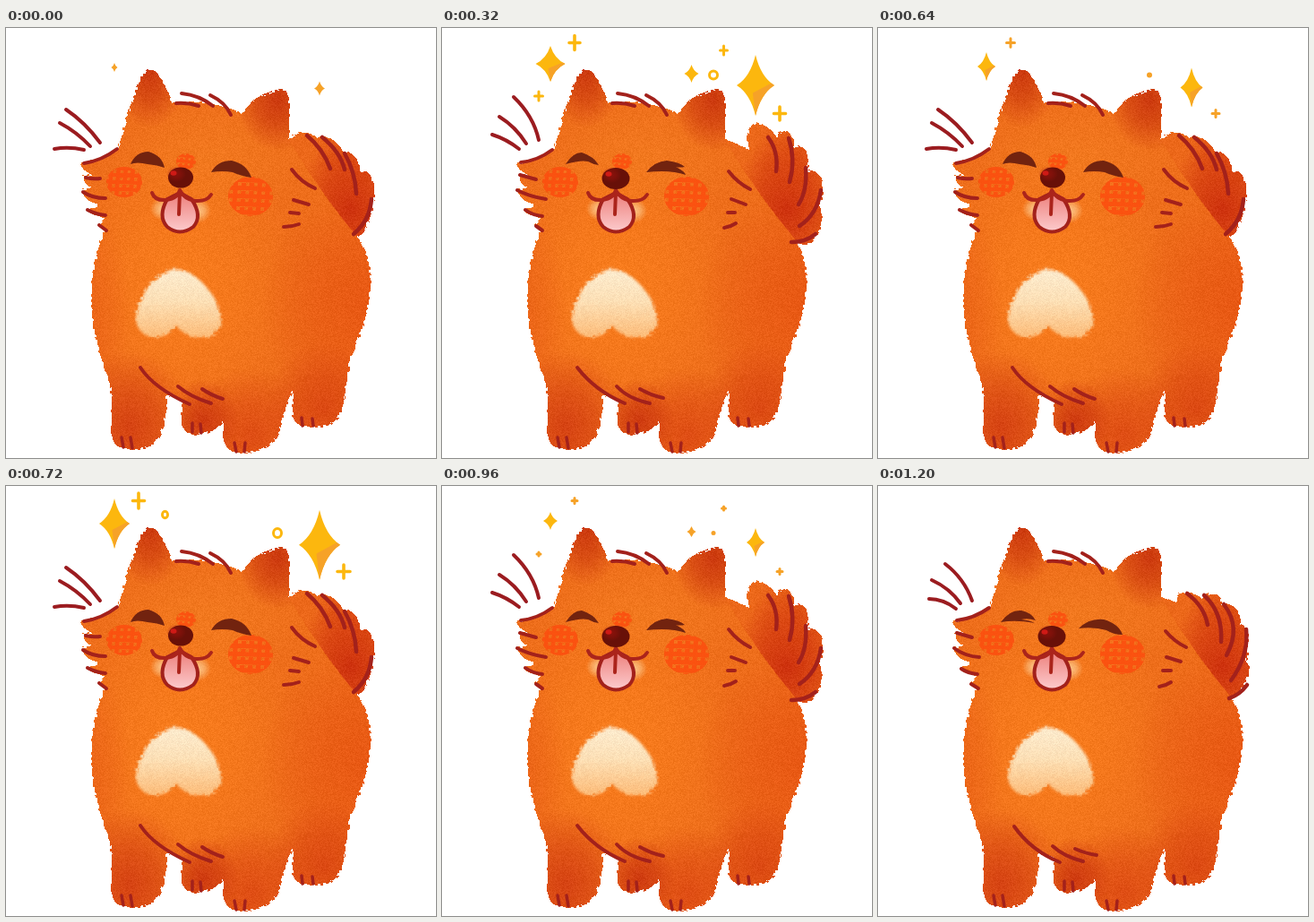
An HTML page with a canvas for the animation above (1280 ms loop, 480 by 480 pixels).

```html
<!DOCTYPE html>
<html lang="en">
<head>
<meta charset="utf-8">
<title>Happy dog</title>
<style>
html, body { margin: 0; width: 100%; height: 100%; overflow: hidden; background: #fff; }
canvas { display: block; width: 100vw; height: 100vh; }
</style>
</head>
<body>
<canvas id="stage" width="480" height="480"></canvas>
<script>
const SIZE = 480, STEP = 80, LOOP = 1280;
const ctx = document.getElementById('stage').getContext('2d');
const LINE = '#a3211b';

const BODY = new Path2D(
  'M125 135C131 113 140 80 150 57Q160 39 170 52Q180 66 185 84Q225 78 262 95Q284 72 308 69Q316 69 316 82' +
  'L316 124C330 150 362 198 393 234Q408 256 407 290Q405 325 385 365L377 418Q373 445 345 446' +
  'Q319 446 320 430L321 405Q314 412 311 430Q304 460 292 468Q270 478 250 472Q241 464 242 450L243 415' +
  'Q210 422 196 414L179 410Q181 445 165 465Q145 475 124 467Q116 460 118 448Q120 400 112 385' +
  'Q95 340 95 300Q96 265 108 230');
const CHEEK = new Path2D(
  'M108 230L114 226Q104 224 103 219L110 212Q96 210 91 203L104 197Q88 194 84 181L96 178' +
  'Q86 174 86 165L98 164Q85 160 83 152Q105 147 125 135L250 150L250 300Z');
const BACK_LEG = new Path2D('M196 405L196 440Q198 454 212 454Q236 452 242 438L243 405Z');
const HEART = new Path2D('M190 269C212 270 239 300 240 326C239 350 205 353 190 332C176 353 146 348 145 324C146 300 169 270 190 269Z');
const TONGUE = new Path2D('M180 191Q169 210 180 222Q194 233 209 222Q220 210 207 191L194 184Z');
const MOUTH = new Path2D('M163 184Q166 193 179 192Q192 190 194 181Q199 191 211 193Q224 194 229 186M194 183L193 208');
const FOREHEAD = new Path2D('M196 73Q216 75 231 87M228 75Q245 83 251 97M190 84Q203 83 215 87');
const TOES = new Path2D('M129 457L131 468M139 457L141 469M208 441L208 451M217 442L218 452M255 463L257 473M267 463L266 473M330 435L331 444M342 436L343 444');

const poses = [
  {
    tail: 'M314 128Q322 115 336 117Q346 119 348 125Q354 117 365 125Q374 131 377 139Q386 136 393 149Q396 155 395 160Q404 157 409 169Q413 185 409 200Q408 216 393 234L330 190Z',
    tailLines: 'M336 120Q354 135 362 157M353 122Q373 138 378 158M378 140Q390 161 391 185M408 191Q406 215 388 230',
    whiskers: 'M67 91Q88 105 105 128M60 106Q79 116 94 132M54 135Q70 132 87 136',
    cheek: 'M87 151Q107 148 124 135M89 167Q97 169 105 168M86 183Q96 190 111 190M91 203Q100 208 111 209M104 220L112 226',
    side: 'M319 158Q329 172 345 179M321 192L338 197M317 206L327 207M310 222Q319 222 327 219',
    belly: 'M150 379Q165 402 205 420M192 400Q206 412 229 419M219 403Q229 410 242 414',
    eyes: 'M139 152Q145 138 159 138Q174 142 177 156Q169 153 158 152Q146 149 139 152ZM229 161Q236 148 252 148Q269 152 274 167Q262 165 253 161Q241 159 229 161Z',
    nose: [195, 167, 14, 11.5]
  },
  {
    tail: 'M316 124L333 130Q330 119 344 119Q356 120 362 126Q366 118 378 121Q385 126 383 133Q397 129 403 142Q406 150 404 155Q414 155 413 175Q414 186 411 195Q418 204 409 222Q404 233 393 237L330 190Z',
    tailLines: 'M345 120Q364 134 368 155M364 122Q385 141 383 174M386 132Q406 158 389 189M411 160Q414 190 394 217M412 222Q404 233 392 237',
    whiskers: 'M75 87Q96 103 105 128M60 105Q80 114 92 131M57 126Q73 126 87 137',
    cheek: 'M88 150Q107 148 124 136M88 164L105 169M85 181Q97 190 113 191M93 204Q100 209 111 210M104 221L112 226',
    side: 'M321 162Q331 174 344 180M322 191L338 196M318 206L327 206M314 224Q321 223 327 219',
    belly: 'M152 380Q171 407 203 420M195 402Q208 414 229 419M220 405Q231 410 244 412',
    eyes: 'M137 152Q147 138 160 139Q171 141 176 150Q167 147 160 149Q170 150 175 153Q154 149 137 152ZM224 159Q236 147 252 149Q269 154 273 166Q263 166 255 161Q241 157 224 159Z',
    nose: [194, 168, 15.5, 12]
  },
  {
    tail: 'M316 124L343 136Q337 110 350 106Q366 108 373 122Q378 112 388 117Q394 124 393 134Q404 128 408 142Q410 152 407 160Q420 156 425 172Q427 185 421 198Q426 205 424 216Q417 241 405 241L390 240L330 190Z',
    tailLines: 'M364 122Q376 138 373 160M387 123Q395 147 388 172M406 156Q408 181 398 197M423 181Q419 208 399 221M417 230Q406 239 390 239',
    whiskers: 'M80 77Q102 98 108 125M64 99Q82 110 94 129M56 119Q72 124 86 135',
    cheek: 'M88 150Q107 148 123 136M87 164L105 169M84 181Q97 188 116 191M93 203Q101 209 112 210M105 221L112 226',
    side: 'M320 160Q330 173 344 180M323 191L339 197M319 206L327 206M315 223Q322 222 328 218',
    belly: 'M151 379Q171 405 204 419M195 400Q208 414 232 419M221 403Q233 410 247 413',
    eyes: 'M138 152Q146 139 156 139Q169 143 175 153Q168 152 163 149Q155 147 138 152ZM228 161Q237 149 251 148Q266 150 271 155Q265 156 261 155Q271 160 272 164Q255 158 228 161Z',
    nose: [194, 168, 15.5, 12]
  }
];
const ORDER = [0, 0, 1, 1, 2, 2, 1, 1];

function makeRandom(seed) {
  return () => (seed = (seed * 16807) % 2147483647) / 2147483647;
}

function layer() {
  const c = document.createElement('canvas');
  c.width = c.height = SIZE;
  return c.getContext('2d');
}

// Soft elliptical spot that fades out at its rim
function glow(g, x, y, rx, ry, rgb, alpha) {
  g.save();
  g.translate(x, y);
  g.scale(rx, ry);
  const fade = g.createRadialGradient(0, 0, 0, 0, 0, 1);
  fade.addColorStop(0, `rgba(${rgb},${alpha})`);
  fade.addColorStop(0.5, `rgba(${rgb},${alpha * 0.6})`);
  fade.addColorStop(1, `rgba(${rgb},0)`);
  g.fillStyle = fade;
  g.fillRect(-1, -1, 2, 2);
  g.restore();
}

function stroke(g, path, color = LINE, width = 4) {
  g.strokeStyle = color;
  g.lineWidth = width;
  g.stroke(typeof path === 'string' ? new Path2D(path) : path);
}

function ellipse(g, x, y, rx, ry, color) {
  g.beginPath();
  g.ellipse(x, y, rx, ry, 0, 0, Math.PI * 2);
  if (color) {
    g.fillStyle = color;
    g.fill();
  }
}

// Roughens the outline in small blocks and adds a fine grain
function grain(g) {
  const rnd = makeRandom(77), cell = 3, cols = SIZE / cell;
  const shift = Array.from({ length: cols * cols }, () => Math.round((rnd() - 0.5) * 2.2));
  const src = g.getImageData(0, 0, SIZE, SIZE);
  const out = g.createImageData(SIZE, SIZE);
  for (let y = 2; y < SIZE - 2; y++) {
    for (let x = 2; x < SIZE - 2; x++) {
      const d = shift[Math.floor(y / cell) * cols + Math.floor(x / cell)];
      const from = ((y + d) * SIZE + x + d) * 4;
      const to = (y * SIZE + x) * 4;
      const n = (rnd() - 0.5) * 16;
      for (let k = 0; k < 3; k++) out.data[to + k] = src.data[from + k] + n;
      out.data[to + 3] = src.data[from + 3] > 127 ? 255 : 0;
    }
  }
  g.putImageData(out, 0, 0);
}

function blush(g, x, y, rx, ry, gap) {
  g.save();
  ellipse(g, x, y, rx, ry, 'rgba(252,78,16,.12)');
  g.clip();
  g.strokeStyle = 'rgba(253,76,14,.82)';
  g.lineWidth = gap * 0.56;
  g.beginPath();
  for (let d = -3 * gap; d <= 3 * gap; d += gap) {
    g.moveTo(x + d + 2, y - ry);
    g.lineTo(x + d - 1, y + ry);
    g.moveTo(x - rx, y + d - 1);
    g.lineTo(x + rx, y + d + 1);
  }
  g.stroke();
  g.restore();
}

function paintTail(g, tail) {
  g.fillStyle = '#ec681a';
  g.fill(tail);
  g.globalCompositeOperation = 'source-atop';
  glow(g, 385, 200, 62, 80, '205,48,14', 1);
  glow(g, 388, 150, 45, 55, '216,66,16', 0.6);
  g.globalCompositeOperation = 'source-over';
}

function paintCoat(g) {
  const coat = layer();
  coat.fillStyle = '#ee6e1b';
  for (const p of [BACK_LEG, BODY, CHEEK]) coat.fill(p);
  coat.globalCompositeOperation = 'source-atop';
  glow(coat, 195, 285, 130, 170, '249,126,29', 0.95);
  glow(coat, 225, 145, 110, 70, '243,124,32', 0.7);
  glow(coat, 405, 310, 120, 140, '230,80,17', 0.75);
  glow(coat, 95, 320, 45, 120, '229,83,19', 0.4);
  glow(coat, 160, 48, 42, 64, '203,56,14', 1);
  glow(coat, 303, 80, 46, 58, '203,56,14', 1);
  glow(coat, 138, 445, 70, 85, '212,64,18', 0.95);
  glow(coat, 275, 455, 75, 75, '218,68,18', 0.8);
  glow(coat, 355, 425, 65, 75, '216,66,17', 0.85);
  glow(coat, 220, 438, 40, 46, '206,58,16', 1);
  g.drawImage(coat.canvas, 0, 0);
}

function paintChest(g) {
  const fill = g.createLinearGradient(0, 270, 0, 348);
  fill.addColorStop(0, '#fdebce');
  fill.addColorStop(0.45, '#fddfb5');
  fill.addColorStop(1, '#fdb974');
  g.save();
  g.filter = 'blur(1.5px)';
  g.fillStyle = fill;
  g.fill(HEART);
  g.restore();
}

function paintFace(g, pose) {
  blush(g, 132, 172, 20, 17, 8);
  blush(g, 273, 188, 25, 22, 9);
  blush(g, 201, 149, 11, 9, 6);
  glow(g, 175, 202, 14, 13, '255,224,174', 0.75);
  glow(g, 214, 204, 15, 14, '255,224,174', 0.75);

  const pink = g.createLinearGradient(0, 188, 0, 226);
  pink.addColorStop(0, '#ee8682');
  pink.addColorStop(1, '#fcc9cb');
  g.fillStyle = pink;
  g.fill(TONGUE);
  stroke(g, TONGUE, LINE, 4);
  stroke(g, MOUTH, '#ab241b', 4);

  const [x, y, rx, ry] = pose.nose;
  ellipse(g, x, y, rx, ry, '#681008');
  glow(g, x - 5, y - 4, 11, 9, '148,18,12', 0.8);
  ellipse(g, x - 8, y - 5, 3.5, 2.8, '#cf1a16');

  g.fillStyle = '#72230f';
  g.fill(new Path2D(pose.eyes));
}

function paintDog(pose) {
  const g = layer();
  paintTail(g, new Path2D(pose.tail));
  paintCoat(g);
  paintChest(g);
  grain(g);
  g.lineCap = g.lineJoin = 'round';
  stroke(g, pose.tailLines, LINE, 4.5);
  stroke(g, pose.whiskers, '#9b1c20', 4);
  for (const p of [pose.cheek, pose.side, pose.belly, FOREHEAD]) stroke(g, p);
  stroke(g, TOES, LINE, 3.5);
  paintFace(g, pose);
  return g.canvas;
}

const GOLD = '#fcb70e', AMBER = '#f6a228';

function star(x, y, w, h) {
  const path = new Path2D();
  const tips = [[0, -h], [w, 0], [0, h], [-w, 0]];
  path.moveTo(x, y - h);
  for (let i = 0; i < 4; i++) {
    const a = tips[i], b = tips[(i + 1) % 4];
    path.quadraticCurveTo(x + (a[0] + b[0]) * 0.28, y + (a[1] + b[1]) * 0.28, x + b[0], y + b[1]);
  }
  ctx.fillStyle = h < 9 ? AMBER : GOLD;
  ctx.fill(path);
  if (h < 12) return;
  ctx.save();
  ctx.clip(path);
  ctx.fillStyle = AMBER;
  ctx.beginPath();
  ctx.moveTo(x + w, y - h * 0.12);
  ctx.lineTo(x - w * 0.15, y + h * 0.25);
  ctx.lineTo(x, y + h);
  ctx.lineTo(x + w, y + h);
  ctx.fill();
  ctx.restore();
}

function plus(x, y, w, h) {
  ctx.strokeStyle = h < 6 ? AMBER : GOLD;
  ctx.lineWidth = h > 6 ? 3.6 : 3;
  ctx.lineCap = 'round';
  ctx.beginPath();
  ctx.moveTo(x, y - h + 1);
  ctx.lineTo(x, y + h - 1);
  ctx.moveTo(x - w + 1, y);
  ctx.lineTo(x + w - 1, y);
  ctx.stroke();
}

function ring(x, y, w, h) {
  ellipse(ctx, x, y, w, h, h < 3.5 ? AMBER : null);
  if (h < 3.5) return;
  ctx.strokeStyle = GOLD;
  ctx.lineWidth = 3;
  ctx.stroke();
}

// Half widths and half heights for each step of a burst
const sparkles = [
  { draw: star, x: 121, y: 44, rise: 1, w: [3.5, 10, 17, 17, 16.5, 8], h: [5, 16, 28, 24, 20, 10] },
  { draw: star, x: 350, y: 67.5, rise: 0.9, w: [6, 12.5, 23, 22, 21, 10], h: [8, 22, 39, 36, 34, 16] },
  { draw: star, x: 278.5, y: 51, rise: 0, w: [0, 0, 0, 5, 8, 5], h: [0, 0, 0, 6, 10, 6] },
  { draw: plus, x: 148, y: 16.5, rise: 0, w: [0, 5.5, 7.5, 7.5, 7, 4], h: [0, 5.8, 9.5, 9.5, 9, 4] },
  { draw: plus, x: 377, y: 95.5, rise: 0, w: [0, 5, 8, 8, 7.5, 4], h: [0, 5, 8.5, 8.5, 8.5, 4] },
  { draw: plus, x: 314.5, y: 25, rise: 0, w: [0, 0, 0, 3, 5, 3], h: [0, 0, 0, 3, 6, 3] },
  { draw: plus, x: 108, y: 76, rise: 0, w: [0, 0, 0, 3, 5.5, 3], h: [0, 0, 0, 3, 6, 3] },
  { draw: ring, x: 303, y: 52.5, rise: 0, w: [0, 3, 4.5, 4.5, 4.5, 2.5], h: [0, 3, 5, 5, 4.5, 2.5] },
  { draw: ring, x: 177.5, y: 32, rise: 0, w: [0, 0, 3, 2, 0, 0], h: [0, 0, 3.8, 2, 0, 0] }
];

const dogs = poses.map(paintDog);

function frame() {
  const tick = Math.floor((performance.now() % LOOP) / STEP);
  ctx.fillStyle = '#fff';
  ctx.fillRect(0, 0, SIZE, SIZE);
  ctx.drawImage(dogs[ORDER[tick % 8]], 0, 0);
  if (tick < 14) {
    const step = tick % 7;
    for (const s of sparkles) {
      if (s.h[step]) s.draw(s.x, s.y - s.rise * step, s.w[step], s.h[step]);
    }
  }
  requestAnimationFrame(frame);
}
frame();
</script>
</body>
</html>
```
